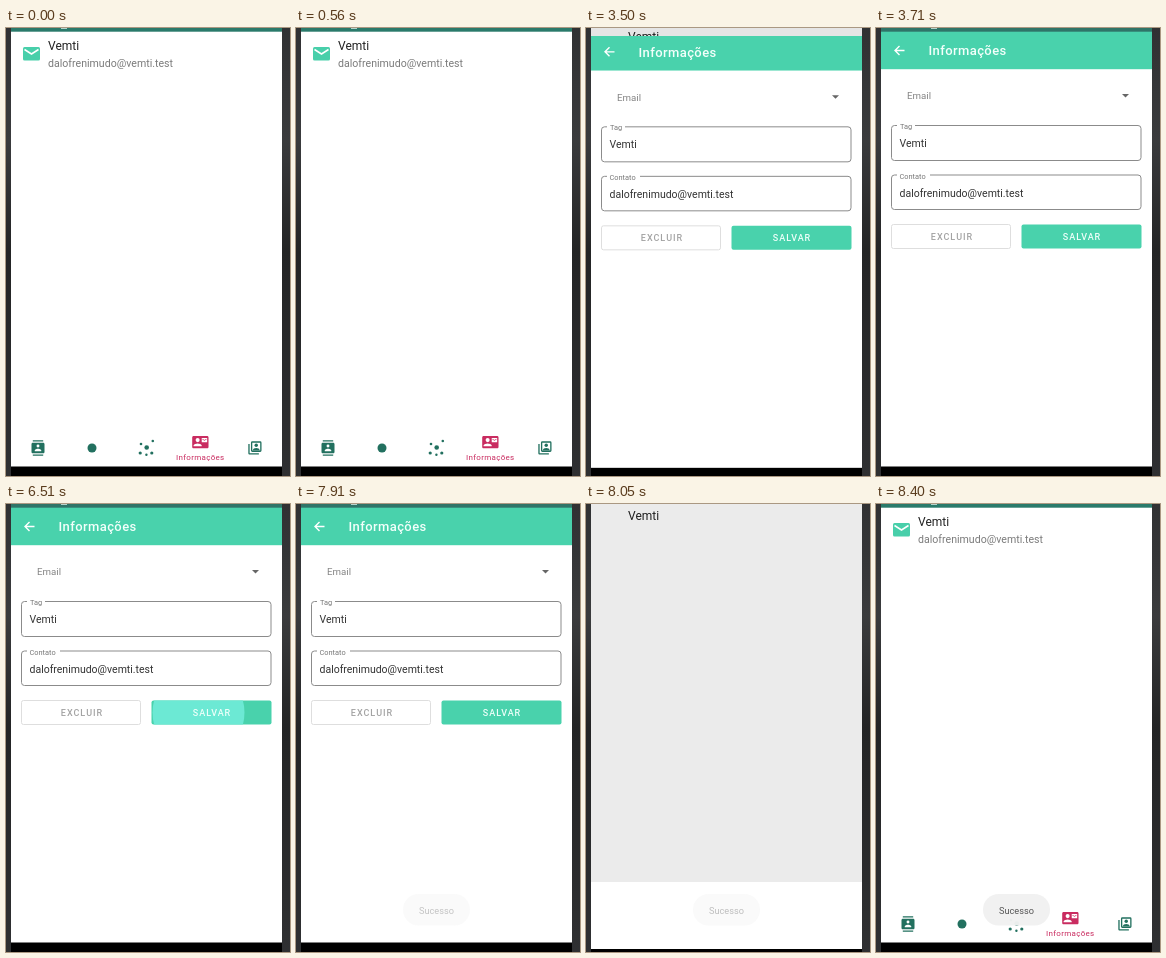
An HTML page for the animation above (9800 ms loop, 284 px wide and 448 px high).

```html
<!DOCTYPE html>
<html lang="pt">
<head>
<meta charset="utf-8">
<title>Informações</title>
<style>
  html, body { margin: 0; width: 100%; height: 100%; overflow: hidden; background: #2a2b2c; }
  svg { display: block; width: 100%; height: 100%; font-family: Roboto, sans-serif; }
  .title { font-size: 12px; fill: #222; }
  .value { font-size: 10.5px; fill: #333; }
  .label { font-size: 7.4px; fill: #777; }
  .button { font-size: 9px; font-weight: 500; letter-spacing: 1px; text-anchor: middle; }
  .field { fill: none; stroke: #8b8b8b; }
  .tabs { fill: #22705f; }
</style>
</head>
<body>
<svg viewBox="0 0 284 448" preserveAspectRatio="none">
  <defs>
    <linearGradient id="metal" x2="0" y2="1">
      <stop stop-color="#303133"/>
      <stop offset=".25" stop-color="#3a3b3d"/>
      <stop offset=".5" stop-color="#232425"/>
      <stop offset="1" stop-color="#2f3032"/>
    </linearGradient>
    <clipPath id="reveal"><rect id="revealBox" width="284" height="448"/></clipPath>
    <clipPath id="saveShape"><rect x="145.5" y="196.5" width="120" height="24" rx="2"/></clipPath>
  </defs>

  <g id="list">
    <rect y="0" width="284" height="480" fill="#fff"/>
    <rect width="284" height="3.7" fill="#2a7a6b"/>
    <rect x="55" width="6" height="1" fill="#b5d3cc"/>
    <g id="mail">
      <rect x="17" y="19" width="17" height="13.5" rx="1.5" fill="#48cfaa"/>
      <path d="M18.5 21.5l7 4.5 7-4.5" fill="none" stroke="#fff" stroke-width="1.5"/>
    </g>
    <text x="42" y="21.5" class="title">Vemti</text>
    <text id="address" x="42" y="39" font-size="10.6" fill="#7b7b7b">dalofrenimudo@vemti.test</text>

    <g class="tabs">
      <path transform="translate(24.2 412.2) scale(.65)" fill-rule="evenodd" d="M20 0H4v2h16zM4 24h16v-2H4zM20 4H4c-1.1 0-2 .9-2 2v12c0 1.1.9 2 2 2h16c1.1 0 2-.9 2-2V6c0-1.1-.9-2-2-2zm-8 2.75a2.25 2.25 0 1 1 0 4.5a2.25 2.25 0 1 1 0-4.5zM17 17H7v-1.5c0-1.67 3.33-2.5 5-2.5s5 .83 5 2.5z"/>
      <circle cx="86" cy="420" r="4.5"/>
      <circle cx="140.7" cy="419.5" r="2.3"/>
      <circle cx="146.8" cy="413" r="1.3"/>
      <circle cx="135" cy="416" r="1.3"/>
      <circle cx="134.2" cy="425" r="1.6"/>
      <circle cx="140.4" cy="426.8" r="1.2"/>
      <circle cx="145.8" cy="425" r="1.6"/>
      <g transform="translate(241 412) scale(.66)">
        <path d="M4 6H2v14c0 1.1.9 2 2 2h14v-2H4z"/>
        <rect x="7" y="3" width="14" height="14" rx="1" fill="none" stroke="#22705f" stroke-width="2"/>
        <circle cx="14" cy="8" r="2.6"/>
        <path d="M8.5 16c1-5 10-5 11 0z"/>
      </g>
    </g>
    <g fill="#c92c60">
      <path transform="translate(186.2 406) scale(.68)" fill-rule="evenodd" d="M21 8V7l-3 2-3-2v1l3 2zM22 3H2C.9 3 0 3.9 0 5v14c0 1.1.9 2 2 2h20c1.1 0 2-.9 2-2V5c0-1.1-.9-2-2-2zM8 6a3 3 0 1 1 0 6a3 3 0 1 1 0-6zM14 18H2v-1c0-2 4-3.1 6-3.1s6 1.1 6 3.1zM22 12h-8V6h8z"/>
      <text x="194.3" y="432" font-size="8" letter-spacing=".3" text-anchor="middle">Informações</text>
    </g>
    <rect y="438.5" width="284" height="50" fill="#000"/>
  </g>
  <rect id="dim" width="284" height="448"/>

  <g clip-path="url(#reveal)">
    <g id="form">
      <rect y="-20" width="284" height="500" fill="#fff"/>
      <rect y="-20" width="284" height="24" fill="#2f7468"/>
      <rect x="55" width="6" height="1" fill="#b5d3cc"/>
      <rect y="3.7" width="284" height="37.5" fill="#49d2ac"/>
      <path d="M28.5 22.5h-9.5M23.5 18l-4.5 4.5 4.5 4.5" fill="none" stroke="#fff" stroke-width="1.4"/>
      <text x="52.5" y="27.4" font-size="13" font-weight="500" letter-spacing=".4" fill="#f3fffb">Informações</text>

      <text x="31" y="71.3" font-size="9.7" fill="#858585">Email</text>
      <path d="M246 66h7l-3.5 3.5z" fill="#666"/>

      <rect class="field" x="15.5" y="97.5" width="249.5" height="35" rx="3"/>
      <rect x="21" y="95" width="18" height="5" fill="#fff"/>
      <text x="24" y="101" class="label">Tag</text>
      <text x="23.5" y="119" class="value">Vemti</text>

      <rect class="field" x="15.5" y="147" width="249.5" height="34.5" rx="3"/>
      <rect x="21" y="145" width="33" height="5" fill="#fff"/>
      <text x="23.5" y="150.5" class="label">Contato</text>
      <text x="23.5" y="168.5" class="value">dalofrenimudo@vemti.test</text>

      <rect x="15.5" y="196.5" width="119" height="24" rx="2" fill="#fff" stroke="#dedede"/>
      <text x="76" y="212" class="button" fill="#a3a3a3">EXCLUIR</text>
      <rect x="145.5" y="196.5" width="120" height="24" rx="2" fill="#49d2ac"/>
      <g clip-path="url(#saveShape)"><circle id="ripple" cx="192.5" cy="208.5" fill="#6ce9d4"/></g>
      <text x="206" y="212" class="button" fill="#effffa">SALVAR</text>
      <rect y="438.5" width="284" height="50" fill="#000"/>
    </g>
  </g>

  <g id="toast">
    <rect x="107" y="390" width="67" height="31.5" rx="15.7" fill="#f1f1f1" fill-opacity=".97"/>
    <text x="140.5" y="410.2" font-size="9.2" text-anchor="middle" fill="#555">Sucesso</text>
  </g>

  <path d="M0 0h5v448h-5zM276 0h8v448h-8z" fill="url(#metal)"/>
</svg>
<script>
const LOOP = 9800, STEP = 70;
const $ = id => document.getElementById(id);
const set = (id, name, value) => $(id).setAttribute(name, value);

// Linear interpolation through [time, value] points.
function track(t, ...points) {
  if (t <= points[0][0]) return points[0][1];
  for (let i = 1; i < points.length; i++) {
    const [t0, v0] = points[i - 1], [t1, v1] = points[i];
    if (t <= t1) return v0 + (v1 - v0) * (t - t0) / (t1 - t0);
  }
  return points[points.length - 1][1];
}

function render(t) {
  const listY = track(t, [3150, 0], [3290, -6], [3430, -8.5], [3570, -9], [7910, -9], [8050, -6], [8190, -2], [8400, 0]);
  const dim = track(t, [3150, 0], [3430, .1], [7910, .1], [8050, .08], [8190, .04], [8400, 0]);
  const formY = track(t, [3150, 18], [3290, 8], [3430, 2], [3640, 0], [7910, 0], [8050, 6.5], [8260, 18]);
  const top = track(t, [3150, 448], [3220, 400], [3290, 150], [3360, 40], [3430, 12], [3640, 0],
    [7910, 0], [7980, 220], [8050, 378], [8120, 420], [8260, 448]);
  set('list', 'transform', `translate(0 ${listY})`);
  set('dim', 'opacity', dim);
  set('form', 'transform', `translate(0 ${formY})`);
  set('revealBox', 'y', top);

  // List details appear late when the screen returns.
  const returning = t >= 7910 && t < 8120;
  set('mail', 'opacity', returning ? 0 : 1);
  set('address', 'fill', returning ? '#fff' : '#7b7b7b');

  set('ripple', 'r', track(t, [6510, 46], [6650, 78]));
  set('ripple', 'opacity', t < 6510 ? 0 : track(t, [6580, 1], [6790, 0]));
  set('toast', 'opacity', track(t, [7770, 0], [7910, .35], [8050, .38], [8400, 1]));
}

const start = performance.now();
function frame() {
  const t = (performance.now() - start) % LOOP;
  render(Math.floor(t / STEP) * STEP);
  requestAnimationFrame(frame);
}
render(0);
frame();
</script>
</body>
</html>
```
